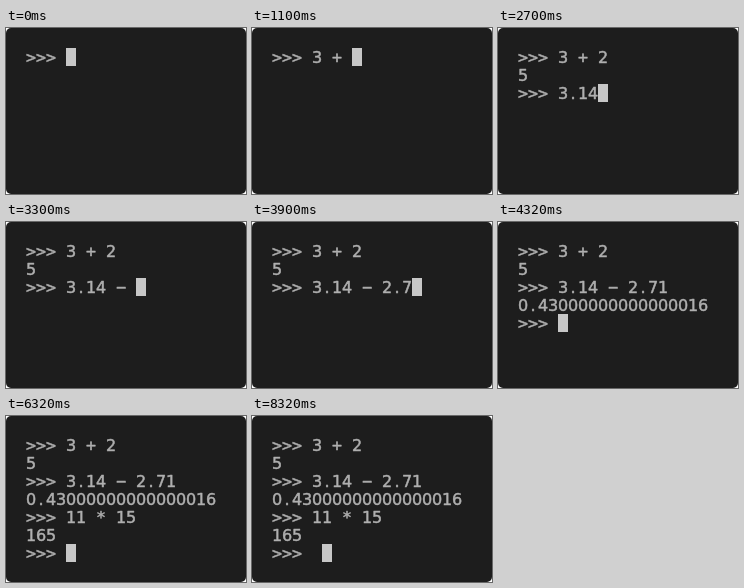
Write an HTML page with a canvas that moves like this. It is 240 by 166 pixels and loops after 8.42 s.

```html
<!DOCTYPE html>
<html lang="en">
<head>
<meta charset="utf-8">
<title>Interactive session</title>
<style>
  html, body { margin: 0; width: 100%; height: 100%; overflow: hidden; background: #fff; }
  canvas { display: block; width: 240px; height: 166px; }
</style>
</head>
<body>
<canvas id="stage" width="240" height="166"></canvas>
<script>
const ctx = document.getElementById('stage').getContext('2d');
const LOOP = 8420, KEY = 200;
const PAD = 20, CELL_W = 10, CELL_H = 18, BASELINE = 14.6;
const BACK = '#1d1d1d', INK = '#afafaf', CURSOR = '#c7c7c7';
const DIGITS = '16px "DejaVu Sans", sans-serif';
const SYMBOLS = '16.6px "DejaVu Sans Mono", monospace';
const PROMPT = '>>> ';

// Each input starts at a time; Enter follows the last key, output comes after a delay.
const inputs = [
  { start: 500, keys: '3 + 2', delay: 100, output: '5' },
  { start: 2100, keys: '3.14 - 2.71', delay: 20, output: '0.43000000000000016' },
  { start: 4820, keys: '11 * 15', delay: 100, output: '165' },
  { start: 8320, keys: ' ', delay: 0, output: '' }
];

function screenAt(time) {
  const rows = [PROMPT];
  for (const { start, keys, delay, output } of inputs) {
    if (time < start) break;
    const typed = Math.floor((time - start) / KEY) + 1;
    rows[rows.length - 1] += keys.slice(0, typed);
    const enter = start + keys.length * KEY;
    if (time < enter) break;
    if (time < enter + delay) {
      rows.push('');
      break;
    }
    rows.push(output, PROMPT);
  }
  return rows;
}

function drawGlyph(char, col, row) {
  if (char === ' ') return;
  ctx.font = /[\d.]/.test(char) ? DIGITS : SYMBOLS;
  const shape = char === '-' ? '\u2212' : char;
  const x = PAD + (col + 0.5) * CELL_W;
  const y = PAD + row * CELL_H + BASELINE;
  ctx.fillText(shape, x, y);
  ctx.strokeText(shape, x, y); // thickens the regular weight
}

function draw(time) {
  ctx.clearRect(0, 0, 240, 166);
  ctx.fillStyle = BACK;
  ctx.beginPath();
  ctx.roundRect(0, 0, 240, 166, 5);
  ctx.fill();

  const rows = screenAt(time);
  ctx.fillStyle = ctx.strokeStyle = INK;
  ctx.lineWidth = 0.5;
  ctx.lineJoin = 'round';
  ctx.textAlign = 'center';
  rows.forEach((text, row) => [...text].forEach((char, col) => drawGlyph(char, col, row)));

  const last = rows.length - 1;
  ctx.fillStyle = CURSOR;
  ctx.fillRect(PAD + rows[last].length * CELL_W, PAD + last * CELL_H, CELL_W, CELL_H);
}

const began = performance.now();
function tick() {
  draw((performance.now() - began) % LOOP);
  requestAnimationFrame(tick);
}
tick();
</script>
</body>
</html>
```
